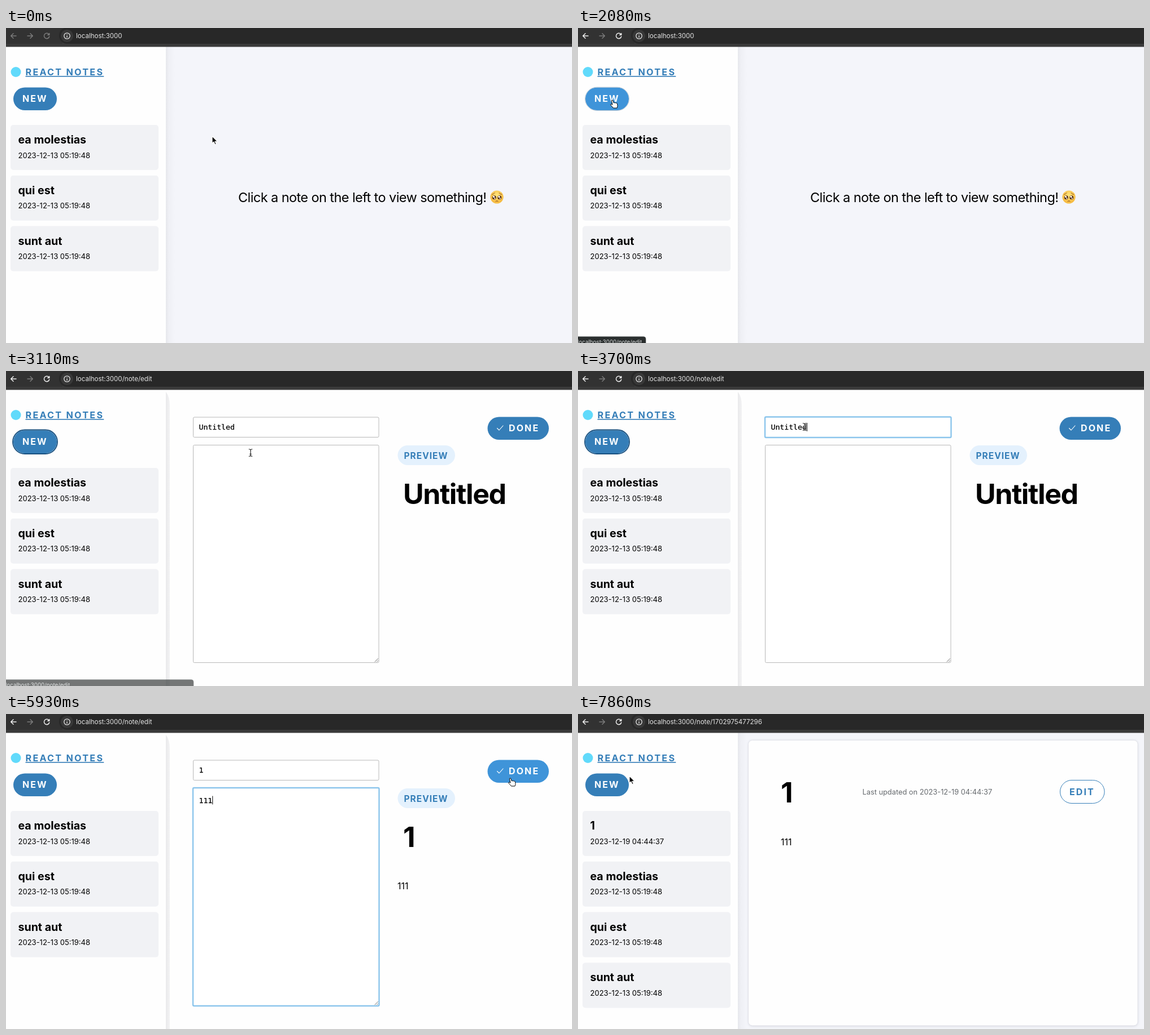
Animation, 1002 px wide and 559 px high, one loop 8000 ms. Source, as an HTML page:

```html
<!DOCTYPE html>
<html lang="en">
<head>
<meta charset="utf-8">
<title>Notes demo</title>
<style>
  html, body { margin: 0; width: 100%; height: 100%; overflow: hidden; background: #fefefe; }
  svg { display: block; width: 100vw; height: 100vh; }
  text { font-family: Inter, "Noto Sans CJK SC", sans-serif; white-space: pre; }
  .mono { font: 13.15px "DejaVu Sans Mono", monospace; stroke: #000; stroke-width: .25px; }
  .label { font-size: 16px; font-weight: 700; letter-spacing: 2.1px; }
  .head { font-size: 50px; font-weight: 700; letter-spacing: -1.4px; }
  .name { font-size: 19.6px; font-weight: 700; }
  .date { font-size: 13.02px; }
  .blue { fill: #357eb8; }
  .line { fill: none; stroke-linecap: round; stroke-linejoin: round; }
</style>
</head>
<body>
<svg viewBox="0 0 1002 559" preserveAspectRatio="none">
  <defs>
    <linearGradient id="shade">
      <stop offset="0" stop-color="#e6e7ec"/>
      <stop offset=".35" stop-color="#eff0f5"/>
      <stop offset="1" stop-color="#f4f5fa"/>
    </linearGradient>
    <linearGradient id="strip">
      <stop offset="0" stop-color="#e9e9eb"/>
      <stop offset="1" stop-color="#f3f3f4"/>
    </linearGradient>
    <radialGradient id="face" cy=".35">
      <stop offset="0" stop-color="#ffe680"/>
      <stop offset="1" stop-color="#f6bd45"/>
    </radialGradient>
    <filter id="soft" x="-5%" y="-5%" width="110%" height="110%"><feGaussianBlur stdDeviation="2"/></filter>
  </defs>

  <rect width="1002" height="559" fill="#f4f5fa"/>
  <rect x="283" y="33" width="16" height="526" fill="url(#shade)"/>

  <g id="home">
    <text x="411" y="309" font-size="23.5" letter-spacing="-.58">Click a note on the left to view something!</text>
    <g transform="translate(869 300)">
      <circle r="11.6" fill="url(#face)"/>
      <g fill="#5a3518">
        <circle cx="-4.7" cy=".8" r="3.5"/><circle cx="4.7" cy=".8" r="3.5"/>
      </g>
      <g fill="#fff">
        <circle cx="-5.5" cy="-.6" r="1.6"/><circle cx="3.9" cy="-.6" r="1.6"/>
        <circle cx="-3.7" cy="2.4" r="1.1"/><circle cx="5.7" cy="2.4" r="1.1"/>
      </g>
      <path class="line" stroke="#8a4b16" d="M-8.4-4.6Q-5.4-5-4-7.4M8.4-4.6Q5.4-5 4-7.4M-2 7.4Q0 5.8 2 7.4"/>
    </g>
  </g>

  <g id="edit">
    <rect x="283" y="33" width="719" height="526" fill="#fefefe"/>
    <path d="M283 37Q290 46 290 62V559H283Z" fill="url(#strip)"/>
    <rect id="titleBox" fill="#fff" rx="2"/>
    <rect id="bodyBox" fill="#fff" rx="2"/>
    <path class="line" stroke="#777" d="M653 516L658.5 510.5M656.5 516L658.5 514"/>
    <rect id="marked" x="342" y="91" width="63.5" height="17" fill="#b3d7fe"/>
    <text id="title" class="mono" x="341.5" y="104"></text>
    <text id="body" class="mono" x="341.5" y="158"></text>
    <rect id="caret" width="1" height="15"/>
    <rect id="done" x="852.5" y="81.5" width="108.5" height="40.5" rx="20.25"/>
    <path class="line" stroke="#fff" stroke-width="1.1" d="M869.5 101.5L873 105L880 97"/>
    <text class="label" x="890" y="107" fill="#fff">DONE</text>
    <rect x="693.5" y="132" width="101.5" height="35" rx="17.5" fill="#e4f1fd"/>
    <text class="label blue" x="704.5" y="155.5" style="font-size:15.5px;letter-spacing:1px">PREVIEW</text>
    <text id="bigTitle" class="head" x="703" y="235.5"></text>
    <text id="bigBody" x="693" y="311" font-size="16"></text>
  </g>

  <g id="view">
    <rect x="302" y="47" width="689" height="507" rx="7" fill="#d5d7df" filter="url(#soft)"/>
    <rect x="301.5" y="46.5" width="689.5" height="506.5" rx="7" fill="#fefefe" stroke="#e2e3e9"/>
    <text class="head" x="359" y="157">1</text>
    <text x="503.5" y="143" font-size="12.8" fill="#666a6e">Last updated on 2023-12-19 04:44:37</text>
    <rect x="853.5" y="117.5" width="78.5" height="41" rx="20.5" fill="#fff" stroke="#357eb8"/>
    <text class="label blue" x="870" y="143.5">EDIT</text>
    <text x="359" y="232.5" font-size="16">111</text>
  </g>

  <rect y="33" width="283" height="526" fill="#fefefe"/>
  <circle cx="17.5" cy="78" r="9" fill="#61dafb"/>
  <text class="label blue" x="34.5" y="84" style="font-size:16.2px;letter-spacing:2.25px;text-decoration:underline;text-underline-offset:2px">REACT NOTES</text>
  <rect id="newPill" x="13" y="105.5" width="77" height="40.5" rx="20.25"/>
  <rect id="ring" fill="none"/>
  <text class="label" x="29" y="131" fill="#fff">NEW</text>
  <g id="notes"></g>

  <rect width="1002" height="33.5" fill="#3a3a3a"/>
  <rect width="100" height="28" fill="#323232"/>
  <rect x="94" y="-1" width="940" height="29" rx="14" fill="#282828"/>
  <circle cx="108" cy="14" r="11" fill="#383838"/>
  <g class="line" stroke-width="1.5">
    <g id="nav">
      <path d="M18 14H9M13 9.7L8.7 14L13 18.3"/>
      <path d="M76.2 11.7A4.7 4.7 0 1 0 76.7 15M76.7 9.5V12.3H73.7"/>
    </g>
    <path stroke="#7c7c7c" d="M38 14H47M43 9.7L47.3 14L43 18.3"/>
    <circle cx="108" cy="14" r="5.2" stroke="#e3e3e3" stroke-width="1.3"/>
    <path stroke="#e3e3e3" stroke-width="1.3" d="M108 13.8V16.5M108 11.5V11.6"/>
  </g>
  <text id="url" x="124" y="18.2" font-size="11.55" fill="#e6e6e6"></text>

  <g id="status">
    <path id="statusBox" stroke="#555b5b" stroke-width=".6"/>
    <text id="statusText" x="-1" y="560.5" font-size="9.8" fill="#d4d7d7"></text>
  </g>

  <g id="cursor">
    <path id="arrow" fill="#000" stroke="#fff" stroke-width="1.1" stroke-linejoin="round" d="M0 0V12.6L2.9 10L5 14.8L7.1 13.9L5 9.2H9Z"/>
    <path id="hand" fill="#fff" stroke="#000" stroke-linejoin="round" d="M-1.7 1Q-1.2-.8.5.2L2.3 5Q3.5 3.8 4.5 5Q5.8 4 6.7 5.4Q8 4.8 8.4 6.3L9 9.5Q9 11.5 7.9 14H1.5Q0 11.7-3.5 8.5Q-3.6 6.9-1.7 7.2L0 8.2Z"/>
    <g id="beam" class="line">
      <path stroke="#fff" stroke-width="2.6" d="M0-5V5"/>
      <path stroke="#111" stroke-width="1.1" d="M-2.8-6.3Q-.4-6.3 0-5Q.4-6.3 2.8-6.3M0-5V5M-2.8 6.3Q-.4 6.3 0 5Q.4 6.3 2.8 6.3M-1.3 2.5H1.3"/>
    </g>
  </g>
</svg>
<script>
const LOOP = 8000, STEP = LOOP / 54;
const BLUE = '#357eb8', HOVER = '#3f94d9';
const OLD = '2023-12-13 05:19:48';
const notes = [['ea molestias', OLD], ['qui est', OLD], ['sunt aut', OLD]];
const saved = [['1', '2023-12-19 04:44:37'], ...notes];

// pointer path: step, x, y
const path = [
  [2, 365, 192], [5, 150, 130], [6, 82, 117], [7, 60, 120], [11, 60, 120],
  [12, 61, 128], [17, 61, 128], [21, 433, 145], [24, 405, 100], [25, 401, 99],
  [26, 313, 90], [29, 313, 90], [31, 401, 147], [33, 380, 170], [38, 380, 170],
  [39, 640, 145], [40, 893, 114], [44, 900, 113], [46, 908, 111], [50, 908, 111],
  [51, 700, 101], [52, 300, 106], [53, 91, 110]
];
const kinds = [[0, 'arrow'], [12, 'hand'], [18, 'arrow'], [20, 'beam'], [36, 'none'],
  [39, 'beam'], [40, 'hand'], [45, 'arrow']];

const $ = id => document.getElementById(id);
const set = (id, attrs) => {
  for (const k in attrs) $(id).setAttribute(k, attrs[k]);
};
const show = (id, on) => set(id, { display: on ? 'inline' : 'none' });
const say = (id, s) => { if ($(id).textContent !== s) $(id).textContent = s; };
const within = (n, a, b) => n >= a && n < b;

function pointAt(n) {
  const i = path.findIndex(p => p[0] >= n);
  if (i <= 0) return path[0].slice(1);
  const [a, x, y] = path[i - 1], [b, u, v] = path[i];
  const f = (n - a) / (b - a);
  return [x + (u - x) * f, y + (v - y) * f];
}

function noteList(list) {
  return list.map(([name, date], i) => {
    const y = 172 + i * 89.8;
    return `<rect x="8" y="${y}" width="262" height="80" rx="5" fill="#f1f2f5"/>
      <text class="name" x="21.5" y="${y + 33}">${name}</text>
      <text class="date" x="21.5" y="${y + 58.5}">${date}</text>`;
  }).join('');
}

function field(id, y, h, focus) {
  const g = focus ? .5 : 0;
  set(id, {
    x: 331.5 - g, y: y - g, width: 328.5 + 2 * g, height: h + 2 * g,
    stroke: focus ? '#8cc5ec' : '#b8b8b8', 'stroke-width': focus ? 2.4 : 1
  });
}

function drawEdit(n) {
  const title = n < 30 ? 'Untitled' : '1';
  const body = '1'.repeat(n < 36 ? 0 : n < 37 ? 1 : n < 39 ? 2 : 3);
  const inTitle = within(n, 24, 33), inBody = n >= 33, picked = within(n, 26, 30);
  field('titleBox', 82, 35.5, inTitle);
  field('bodyBox', 131.5, 386, inBody);
  say('title', title);
  say('body', body);
  say('bigTitle', title);
  say('bigBody', body);
  show('marked', picked);
  show('caret', (inTitle && !picked) || inBody);
  const count = (inBody ? body : title).length;
  set('caret', { x: 341.5 + count * 7.92, y: inBody ? 145.5 : 92 });
  set('done', { fill: n >= 40 ? HOVER : BLUE });
}

function drawNew(n) {
  const pressed = n < 15, g = pressed ? .4 : 1;
  set('newPill', { fill: within(n, 12, 18) ? HOVER : BLUE });
  show('ring', within(n, 14, 26));
  set('ring', {
    x: 13 - g, y: 105.5 - g, width: 77 + 2 * g, height: 40.5 + 2 * g, rx: 20.25 + g,
    stroke: pressed ? '#b3c3d1' : '#19507f', 'stroke-width': pressed ? 1 : 1.8
  });
}

function drawStatus(n) {
  const waiting = n >= 42;
  const w = within(n, 12, 15) ? 120 : 332;
  show('status', within(n, 12, 22) || within(n, 42, 49));
  set('status', { opacity: n === 12 || n === 21 ? .65 : n === 48 ? .5 : 1 });
  set('statusBox', {
    d: `M-2 547.7H${w - 4}Q${w} 547.7 ${w} 551.7V562H-2Z`,
    fill: waiting ? '#1d2222' : '#2b2f2f'
  });
  say('statusText', waiting ? '正在等待 localhost 的响应' : 'localhost:3000/note/edit');
}

let listed;
function draw(t) {
  const n = Math.min(53, Math.floor((t + 5) / STEP));
  const page = n < 15 ? 'home' : n < 45 ? 'edit' : 'view';
  for (const p of ['home', 'edit', 'view']) show(p, p === page);
  say('url', 'localhost:3000' + { home: '', edit: '/note/edit', view: '/note/1702975477296' }[page]);
  set('nav', { stroke: n < 9 ? '#7c7c7c' : '#f0f0f0' });
  const list = page === 'view' ? saved : notes;
  if (list !== listed) $('notes').innerHTML = noteList(listed = list);
  drawNew(n);
  if (page === 'edit') drawEdit(n);
  drawStatus(n);
  const kind = kinds.filter(k => k[0] <= n).pop()[1];
  for (const k of ['arrow', 'hand', 'beam']) show(k, k === kind);
  set('cursor', { transform: `translate(${pointAt(n)})` });
}

const start = performance.now();
function tick() {
  draw((performance.now() - start) % LOOP);
  requestAnimationFrame(tick);
}
tick();
</script>
</body>
</html>
```
